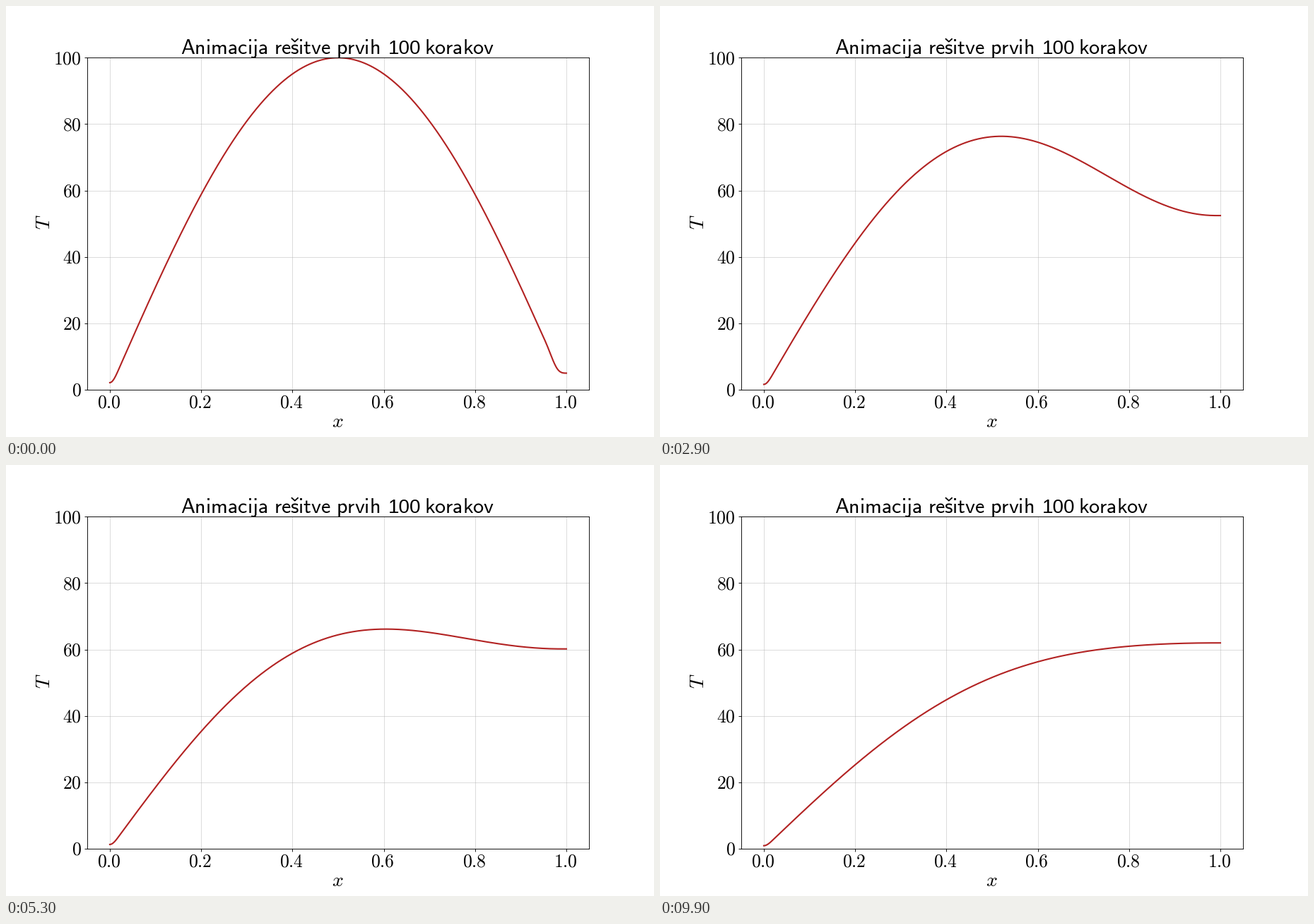
A matplotlib script for the animation above (10000 ms loop, 917x611 px).

```python
import numpy as np
import matplotlib.pyplot as plt
from matplotlib.animation import FuncAnimation
from matplotlib.lines import Line2D

W, H, DPI = 917, 611, 100
CELLS, STEPS, DT = 50, 100, 0.001
THIN = 0.65
plt.rcParams["mathtext.fontset"] = "cm"


def tridiag(side, middle, last):
    """Operator on the inner coefficients: zero at x=0, no flux at x=1."""
    n = CELLS - 1
    m = middle * np.eye(n) + side * (np.eye(n, k=1) + np.eye(n, k=-1))
    m[-1, -1] = last
    return m


def heat_history():
    """Cubic B-spline collocation with Crank-Nicolson steps."""
    h = 1 / CELLS
    mass = tridiag(1, 4, 5) / 6
    stiff = tridiag(1, -2, -1) / h**2
    nodes = np.arange(1, CELLS) * h
    c = np.linalg.solve(mass, 100 * np.sin(np.pi * nodes))
    step = np.linalg.solve(mass - DT / 2 * stiff, mass + DT / 2 * stiff)
    history = [c]
    for _ in range(STEPS - 1):
        history.append(step @ history[-1])
    return history


def spline(c, x):
    full = np.concatenate([[c[0], 0], c, [c[-1], c[-1]]])
    j = np.minimum((x * CELLS).astype(int), CELLS - 1)
    u = x * CELLS - j
    return ((1 - u)**3 * full[j]
            + (3 * u**3 - 6 * u**2 + 4) * full[j + 1]
            + (-3 * u**3 + 3 * u**2 + 3 * u + 1) * full[j + 2]
            + u**3 * full[j + 3]) / 6


fig, ax = plt.subplots(figsize=(W / DPI, H / DPI), dpi=DPI)
fig.subplots_adjust(left=0.125, right=0.9, bottom=0.11, top=0.88)
ax.set(xlim=(-0.05, 1.05), ylim=(0, 100))
ax.set_xticks(np.arange(6) / 5)
ax.set_yticks(np.arange(0, 101, 20))
ax.tick_params(labelbottom=False, labelleft=False, width=THIN, length=3)
ax.grid(alpha=0.48, lw=THIN)
ax.spines[:].set_linewidth(THIN)


def write(x, y, text, size, ha="center", **kw):
    return fig.text(x / W, 1 - y / H, text, fontsize=size, ha=ha,
                    va="baseline", **kw)


def math(x, y, text, size, ha="center", **kw):
    return write(x, y, f"${text}$", size, ha, **kw)


def sans(x, text, ha="left"):
    text = text.replace(" ", r"\ ")
    return math(x, 67.5, rf"\mathsf{{{text}}}", 21.6, ha)


left, right = 0.125 * W, 0.9 * W
top, bottom = 0.12 * H, 0.89 * H
for i in range(6):
    tick_x = left + (right - left) * (0.05 + i / 5) / 1.1
    math(tick_x - 1.3, 570, f"{i / 5:.1f}", 18.5)
    math(107, bottom + (top - bottom) * i / 5 + 9, str(20 * i), 18.5, "right")

math(469.5, 597, "x", 20)
math(62, 306.5, "T", 20, rotation=90, rotation_mode="anchor")

# title, with a hand-drawn caron over the s
s_left = sans(247, "Animacija re").get_window_extent().x1 - 1
sans(s_left - 1, "sitve prvih")
caron = s_left + 5.7
fig.add_artist(Line2D(np.array([caron - 4.2, caron, caron + 4.2]) / W,
                      1 - np.array([46.8, 50.6, 46.8]) / H,
                      color="black", lw=1.3))
write(564, 67.5, "100", 20, family="Liberation Sans")
sans(691, "korakov", "right")

xs = np.linspace(0, 1, 1001)
curves = [spline(c, xs) for c in heat_history()]
line, = ax.plot(xs, curves[0], color="firebrick", lw=1.5)


def update(i):
    line.set_ydata(curves[i])
    return line,


anim = FuncAnimation(fig, update, frames=STEPS, interval=100,
                     repeat=True, repeat_delay=0)
plt.show()
```
